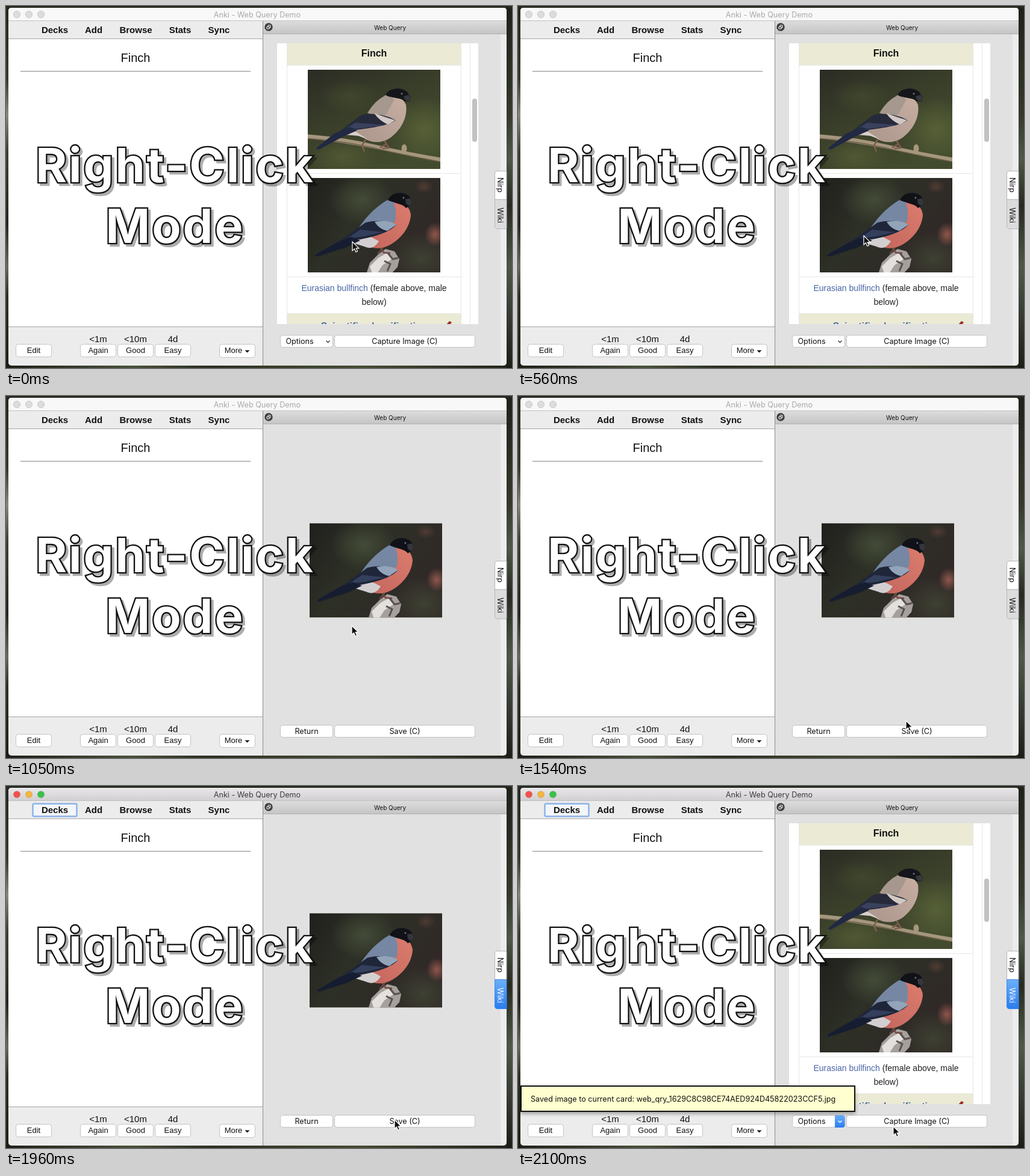
An HTML page that plays this animation: 840 by 602 pixels, repeating every 2.17 s.

```html
<!DOCTYPE html>
<html lang="en">
<head>
<meta charset="utf-8">
<title>Web Query Demo</title>
<style>
html, body { margin: 0; width: 100%; height: 100%; overflow: hidden; background: #1f2219; }
svg { display: block; width: 840px; height: 602px; }
text { font: 12.6px Inter, "Open Sans", sans-serif; fill: #111; }
.web text, text.web { font: 15px "Liberation Sans", Arial, sans-serif; }
.web .small { font-size: 13px; }
.web .bold { font-weight: bold; }
.web .body { font-size: 14px; fill: #222; }
.web .link { fill: #4a66a6; }
.web .head { font-size: 16px; font-weight: bold; }
.mid { text-anchor: middle; }
.btn { fill: #fff; stroke: #c3c3c3; }
.line { fill: none; stroke: #e6e6e6; }
.off { display: none; }
.big { filter: drop-shadow(4px 4px 0 rgba(0,0,0,.32)); }
.big text {
  font: 700 79px Inter, Lato, sans-serif; letter-spacing: 3px; text-anchor: middle;
  fill: #fff; stroke: #111; stroke-width: 4.6; stroke-linejoin: miter; paint-order: stroke;
}
</style>
</head>
<body>
<svg viewBox="0 0 840 602">
<defs>
  <linearGradient id="bar" x2="0" y2="1"><stop stop-color="#e9e7e9"/><stop offset="1" stop-color="#d1cfd1"/></linearGradient>
  <linearGradient id="dock" x2="0" y2="1"><stop stop-color="#dcdcdc"/><stop offset="1" stop-color="#c4c4c4"/></linearGradient>
  <linearGradient id="blue" x2="0" y2="1"><stop stop-color="#6cb0f9"/><stop offset="1" stop-color="#2a7bf0"/></linearGradient>
  <linearGradient id="left" x2="0" y2="1">
    <stop stop-color="#23271d"/><stop offset=".2" stop-color="#34392d"/><stop offset=".3" stop-color="#85897c"/>
    <stop offset=".4" stop-color="#3c4134"/><stop offset=".6" stop-color="#23261e"/>
    <stop offset=".72" stop-color="#666b5d"/><stop offset=".8" stop-color="#2c3024"/><stop offset="1" stop-color="#1b1e16"/>
  </linearGradient>
  <linearGradient id="right" x2="0" y2="1">
    <stop stop-color="#1e2119"/><stop offset=".3" stop-color="#34392c"/><stop offset=".42" stop-color="#50564a"/>
    <stop offset=".55" stop-color="#262a20"/><stop offset=".72" stop-color="#50564a"/><stop offset="1" stop-color="#1b1e16"/>
  </linearGradient>
  <linearGradient id="floor">
    <stop stop-color="#1c1f17"/><stop offset=".25" stop-color="#4a513b"/><stop offset=".4" stop-color="#2b3022"/>
    <stop offset=".7" stop-color="#454c33"/><stop offset="1" stop-color="#20231a"/>
  </linearGradient>
  <linearGradient id="meadow" x2=".6" y2="1">
    <stop stop-color="#2b2c24"/><stop offset=".5" stop-color="#3a3f2a"/><stop offset="1" stop-color="#434b2e"/>
  </linearGradient>
  <radialGradient id="leaf"><stop stop-color="#566036"/><stop offset="1" stop-color="#566036" stop-opacity="0"/></radialGradient>
  <linearGradient id="dusk" x2="1" y2=".5">
    <stop stop-color="#20201d"/><stop offset=".45" stop-color="#2d3026"/><stop offset="1" stop-color="#302827"/>
  </linearGradient>
  <radialGradient id="moss"><stop stop-color="#434b37"/><stop offset="1" stop-color="#434b37" stop-opacity="0"/></radialGradient>
  <radialGradient id="berry"><stop stop-color="#8f564c"/><stop offset="1" stop-color="#8f564c" stop-opacity="0"/></radialGradient>
  <linearGradient id="tan" x1="1" x2="0" y2="1"><stop stop-color="#c9afa3"/><stop offset="1" stop-color="#a8948b"/></linearGradient>
  <linearGradient id="coral" x1="1" x2="0" y2="1"><stop stop-color="#db7c6e"/><stop offset="1" stop-color="#c4665d"/></linearGradient>
  <filter id="soft"><feGaussianBlur stdDeviation=".7"/></filter>
  <clipPath id="page"><rect x="450" y="62" width="334" height="467"/></clipPath>
  <clipPath id="henFrame"><rect x="501" y="106" width="220" height="165"/></clipPath>
  <clipPath id="cockFrame"><rect x="501" y="286" width="220" height="157"/></clipPath>

  <g id="hen" clip-path="url(#henFrame)">
    <rect x="501" y="106" width="220" height="165" fill="url(#meadow)"/>
    <ellipse cx="695" cy="205" rx="60" ry="55" fill="url(#leaf)"/>
    <ellipse cx="560" cy="250" rx="60" ry="34" fill="url(#leaf)" opacity=".7"/>
    <ellipse cx="570" cy="150" rx="50" ry="30" fill="url(#leaf)" opacity=".35"/>
    <g filter="url(#soft)">
      <path d="M495 213Q560 218 615 231T727 253V260Q665 248 610 237T495 220Z" fill="#a5967d"/>
      <path d="M495 220Q560 224 610 236T727 260" fill="none" stroke="#6b5d49" stroke-width="1.5"/>
      <ellipse cx="661" cy="237" rx="4.500" ry="7" fill="#a5967d"/>
      <path d="M597 222l-6 10 4 10M628 224l8 12-11 1M630 230l-9 6" fill="none" stroke="#7f5d4f" stroke-width="2.5"/>
      <path d="M631 147C645 146 659 152 664 164 667 184 657 203 643 215 630 228 610 229 598 222L572 205 606 176Z" fill="url(#tan)"/>
      <path d="M631 148Q612 157 600 178L630 182 645 155Z" fill="#a6988f"/>
      <path d="M573 204l28 18-16-6-22-2z" fill="#d5cfca"/>
      <path d="M590 181C607 176 634 182 647 190 630 201 596 204 566 208L549 213 566 199Z" fill="#262a3b"/>
      <path d="M611 178C624 183 637 187 646 190L634 197C625 193 618 188 611 178Z" fill="#d2c8c3"/>
      <path d="M580 194l50 4-38 5-32 3z" fill="#3a415c"/>
      <path d="M571 201L545 212 514 237 519 239 560 217 583 207Z" fill="#222942"/>
      <path d="M630 148C634 137 655 133 666 143L672 152 670 159 661 158C656 152 640 154 630 148Z" fill="#15161b"/>
      <path d="M660 150l9-2 3 5-3 6-7-3z" fill="#37383d"/>
      <circle cx="657" cy="146" r="1.4" fill="#767a82"/>
    </g>
  </g>

  <g id="cock" clip-path="url(#cockFrame)">
    <rect x="501" y="286" width="220" height="157" fill="url(#dusk)"/>
    <ellipse cx="590" cy="322" rx="55" ry="42" fill="url(#moss)"/>
    <ellipse cx="690" cy="420" rx="55" ry="45" fill="url(#moss)" opacity=".7"/>
    <ellipse cx="712" cy="380" rx="17" ry="20" fill="url(#berry)"/>
    <ellipse cx="694" cy="300" rx="16" ry="12" fill="url(#berry)" opacity=".35"/>
    <g filter="url(#soft)">
      <path d="M598 446L604 427 618 413 630 404 645 408 653 421 650 434 639 446Z" fill="#a5a09d"/>
      <path d="M604 433l14-14 14-8 8 10-15 10-9 14h-8z" fill="#e3e0de"/>
      <path d="M634 411l8 10 9-2M628 424l10 5-5 12" fill="none" stroke="#5b514d" stroke-width="3"/>
      <path d="M619 398l8 12 11 1M626 402l-9 10" fill="none" stroke="#6d4841" stroke-width="2.5"/>
      <path d="M638 324C654 320 670 331 672 347 671 367 657 386 638 397 624 405 608 404 599 398L612 372Z" fill="url(#coral)"/>
      <path d="M569 392L598 380 619 391C613 401 605 405 595 400Z" fill="#d3cfd0"/>
      <path d="M638 320C648 328 648 344 646 358L622 374 576 384C590 360 609 335 638 320Z" fill="#7587a3"/>
      <path d="M597 360C616 355 640 358 648 364 634 379 603 386 571 391L549 394 572 378Z" fill="#1f2639"/>
      <path d="M612 359C626 356 641 358 648 364L633 374C624 372 617 367 612 359Z" fill="#93a4ba"/>
      <path d="M588 372l38 4-31 7-29 4z" fill="#343f5c"/>
      <path d="M573 384L549 393 513 414 516 417 563 402 588 390Z" fill="#171d31"/>
      <path d="M634 323C639 310 658 307 669 316L674 325 671 332 664 336C659 329 648 329 634 323Z" fill="#101218"/>
      <path d="M663 321l8-1 3 6-4 7-6-4z" fill="#34363c"/>
      <circle cx="660" cy="319" r="1.4" fill="#717780"/>
    </g>
  </g>
</defs>

<rect width="840" height="602" fill="url(#floor)"/>
<rect width="4" height="602" fill="url(#left)"/>
<rect x="831" width="9" height="602" fill="url(#right)"/>
<rect width="840" height="3" fill="#262a20"/>
<rect x="4" y="3" width="827" height="595" rx="5" fill="#ececec"/>

<!-- title bar -->
<path id="title" d="M4 24V8q0-5 5-5h817q5 0 5 5v16z"/>
<path d="M4 24.5H831" stroke="#c2c2c2"/>
<g id="lights"><circle cx="18" cy="14" r="5.6"/><circle cx="38" cy="14" r="5.6"/><circle cx="58" cy="14" r="5.6"/></g>
<text id="caption" class="mid" x="417" y="19">Anki - Web Query Demo</text>

<!-- card side -->
<rect x="4" y="55" width="422" height="478" fill="#fff"/>
<path d="M4 54.5H426M4 533.5H426" stroke="#a6a6a6"/>
<path d="M24 108.5H406" stroke="#858585"/>
<rect id="focus" x="44.5" y="29.5" width="73" height="21" rx="2" fill="#f3f5f8" stroke="#8cb3e8" stroke-width="2.5"/>
<g class="web" id="menu"></g>
<text class="web mid" x="215" y="93" style="font-size:20px">Finch</text>
<g class="web" id="answers"></g>
<path d="M396.500 572.500h8l-4 4z" fill="#111"/>

<!-- dock -->
<rect x="427" y="47" width="394" height="551" fill="#e1e1e1"/>
<rect x="427" y="25" width="404" height="22" fill="url(#dock)"/>
<path d="M427 46.500H831" stroke="#b0b0b0"/>
<path d="M426.500 25V598" stroke="#8c8c8c"/>
<circle cx="436" cy="35" r="6.700" fill="#3d3d3d"/>
<path d="M433 34.500h4v3.500h-4zM435 34v-2h4v4h-2" fill="none" stroke="#fff"/>
<text class="mid" x="637.500" y="40" style="font-size:10px">Web Query</text>
<path d="M831 274.500H816q-4.500 0-4.500 4.500V322H831z" fill="#fff" stroke="#b5b5b5"/>
<path id="tab" d="M831 322H811.500V366q0 4.500 4.500 4.500H831z"/>
<text class="mid" transform="translate(815.500 297.500)rotate(90)">Nirp</text>
<text id="tabText" class="mid" transform="translate(815.500 348)rotate(90)">Wiki</text>

<g id="browse">
  <g clip-path="url(#page)" class="web">
    <rect x="450" y="62" width="334" height="467" fill="#fff"/>
    <path d="M467 62h288v36H467zM467 512h288v18H467z" fill="#ebebd5"/>
    <path class="line" d="M466.500 62V529M755.500 62V529M770.500 62V529M467 98.500H755M467 278.500H755M467 450.500H755M467 511.500H755"/>
    <rect x="774" y="154" width="8" height="72" rx="4" fill="#c1c1c1"/>
    <text class="head mid" x="611" y="84">Finch</text>
    <use href="#hen"/><use href="#cock"/>
    <text class="body mid" x="611" y="474"><tspan class="link">Eurasian bullfinch</tspan> (female above, male</text>
    <text class="body mid" x="611" y="497">below)</text>
    <text class="head link mid" x="611" y="537.500">Scientific classification</text>
    <path d="M730 531l6-7 4 2-4 6z" fill="#9c2f2c"/>
  </g>
  <g id="browseBtns"></g>
  <path id="combo" d="M526 547.500h12.500q4 0 4 4v12.500q0 4-4 4H526z" fill="url(#blue)"/>
  <path id="chevron" d="M531.500 556.500l3 3 3-3" fill="none" stroke-width="1.300"/>
</g>
<g id="capture">
  <use href="#cock" x="3" y="-74.500"/>
  <g id="captureBtns"></g>
</g>

<g id="toast">
  <rect x="5" y="499" width="554" height="42" fill="#ffffcf" stroke="#111" stroke-width="2" style="filter:drop-shadow(0 3px 3px rgba(0,0,0,.35))"/>
  <text x="21" y="525">Saved image to current card: web_qry_1629C8C98CE74AED924D45822023CCF5.jpg</text>
</g>

<g class="big"><text x="281" y="292.500">Right-Click</text><text x="281" y="393.500">Mode</text></g>

<g id="ring" fill="none"><circle cx="575" cy="385" r="20" stroke="#fff" stroke-width="5" opacity=".6"/><circle cx="575" cy="385" r="20" stroke="#45cf22" stroke-width="2.800"/></g>
<path id="cursor" d="M0 0V15L3.500 11.800 5.800 17.200 8.500 16 6.200 10.800H10.800Z" fill="#0b0b0b" stroke="#fff" stroke-width="1.200"/>
</svg>
<script>
const $ = id => document.getElementById(id);
const button = (x, y, w, h, label, cls = "", cx = x + w / 2) =>
  `<rect class="btn" x="${x + .5}" y="${y + .5}" width="${w - 1}" height="${h - 1}" rx="4"/>
   <text class="mid ${cls}" x="${cx}" y="${y + 15}">${label}</text>`;

$("menu").innerHTML = [["Decks", 81], ["Add", 145.5], ["Browse", 215.5], ["Stats", 289], ["Sync", 353.5]]
  .map(([s, x]) => `<text class="bold mid" x="${x}" y="45">${s}</text>`).join("");
$("answers").innerHTML =
  [["&lt;1m", 153], ["&lt;10m", 215], ["4d", 277]]
    .map(([s, x]) => `<text class="mid" x="${x}" y="559">${s}</text>`).join("") +
  [["Edit", 16], ["Again", 123], ["Good", 185], ["Easy", 247]]
    .map(([s, x]) => button(x, 562, 60, 22, s, "small")).join("") +
  button(354, 562, 60, 23, "More", "small", 377.5);
$("browseBtns").innerHTML = button(455, 547, 88, 21, "Options", "", 487.5) + button(545, 547, 234, 21, "Capture Image (C)");
$("captureBtns").innerHTML = button(455, 547, 88, 21, "Return") + button(545, 547, 234, 21, "Save (C)");

const LOOP = 2170, STEP = 70, CLICK = 630, ACTIVE = 1960, SAVED = 2100;
// time, x, y of the pointer tip
const path = [[0, 575, 392], [420, 574, 382], [1120, 574, 382], [1540, 644, 540], [1820, 645, 555], [1960, 645, 555], [2100, 623, 566]];

function pointer(t) {
  const i = path.findIndex(p => p[0] > t);
  if (i < 0) return path[path.length - 1].slice(1);
  const [t0, x0, y0] = path[i - 1], [t1, x1, y1] = path[i];
  const u = (t - t0) / (t1 - t0), k = u * u * (3 - 2 * u);
  return [x0 + (x1 - x0) * k, y0 + (y1 - y0) * k].map(Math.round);
}
const show = (id, on) => $(id).classList.toggle("off", !on);
const paint = (el, fill, stroke) => { el.style.fill = fill; if (stroke) el.style.stroke = stroke; };

function draw(t) {
  const active = t >= ACTIVE, captured = t >= CLICK && t < SAVED;
  show("browse", !captured);
  show("capture", captured);
  show("toast", t >= SAVED);
  show("ring", t >= CLICK && t < CLICK + 3 * STEP);
  show("focus", active);
  show("combo", active);
  paint($("title"), active ? "url(#bar)" : "#f8f8f8");
  paint($("caption"), active ? "#3c3c3c" : "#a9a9a9");
  paint($("tab"), active ? "url(#blue)" : "#dcdcdc", active ? "#3f86ea" : "#b9b9b9");
  paint($("tabText"), active ? "#fff" : "#111");
  $("chevron").style.stroke = active ? "#fff" : "#333";
  ["#f4514d", "#f5b63d", "#37c24b"].forEach((c, i) =>
    paint($("lights").children[i], active ? c : "#dcdcdc", active ? "rgba(0,0,0,.12)" : "#c9c9c9"));
  $("cursor").setAttribute("transform", `translate(${pointer(t)})`);
}
function tick() {
  draw(Math.floor(performance.now() % LOOP / STEP) * STEP);
  requestAnimationFrame(tick);
}
tick();
</script>
</body>
</html>
```
